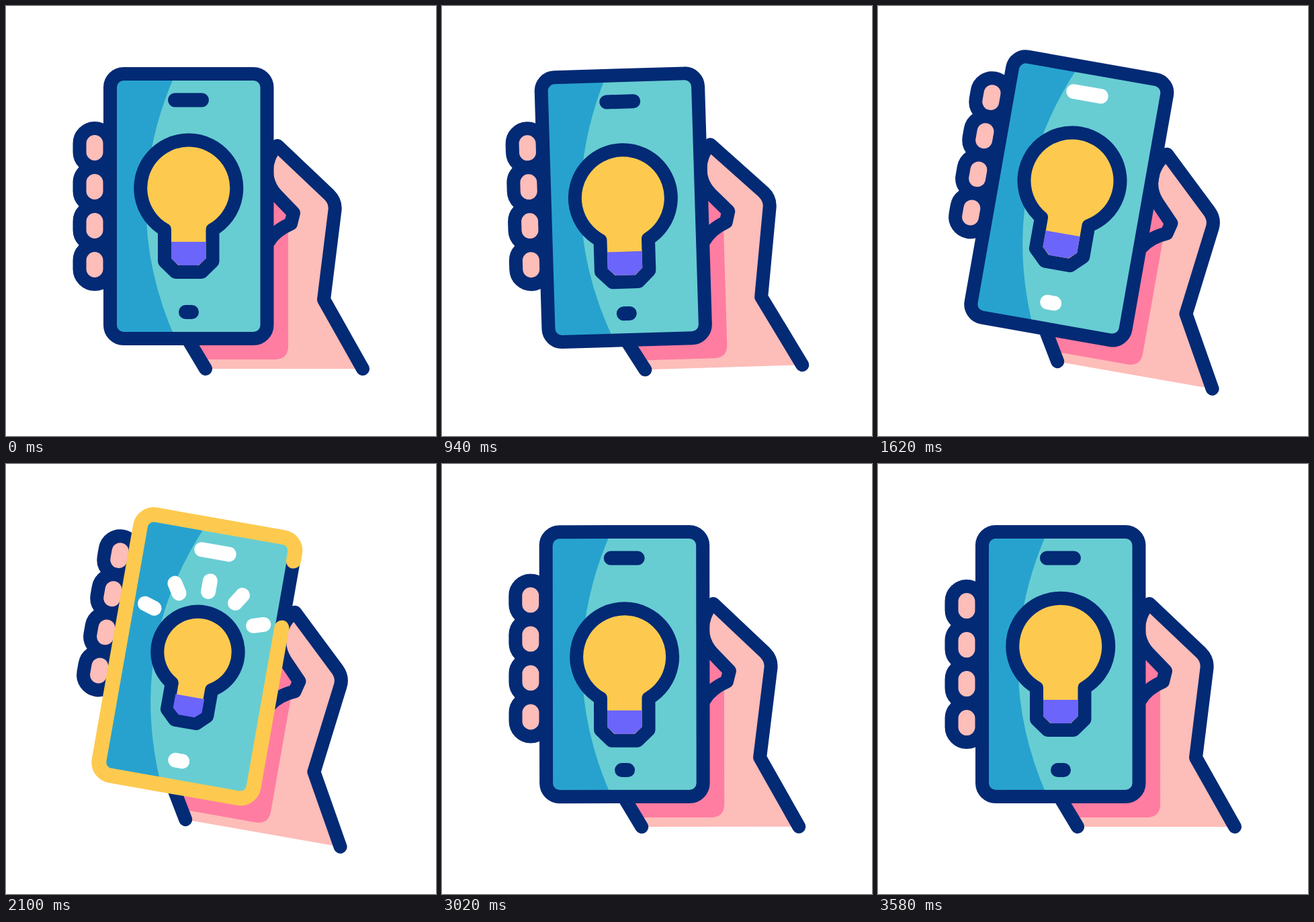
These frames come from a looping animation (640x640 px, 3600 ms). An HTML page:

```html
<!DOCTYPE html>
<html lang="en">
<head>
<meta charset="utf-8">
<title>Phone light</title>
<style>
  html, body { margin: 0; width: 100%; height: 100%; overflow: hidden; background: #fff; }
  svg { display: block; width: 100%; height: 100%; }
  .line { fill: none; stroke: #032a75; stroke-width: 20; stroke-linecap: round; stroke-linejoin: round; }
  .glow { fill: none; stroke: #fff; stroke-width: 22; stroke-linecap: round; stroke-linejoin: round; }
  .skin { fill: #fdbdb9; }
</style>
</head>
<body>
<svg viewBox="0 0 640 640">
  <g id="all">
    <path class="skin" d="M297 540H531L473 437 489 304Q490 290 480 281L404 208C392 218 388 235 388 245H250V462Z"/>
    <path fill="#ff7da1" d="M257 473 289 526H400Q420 526 420 506V328L424 324 428 308 402 283 380 270H257Z"/>
    <path class="line" d="M258 475 297 540"/>
    <path class="line" d="M531 540 473 437 489.500 304Q491 291 481 281L404 208C392 218 388 235 388 245C388 260 393 271 402 281L428 308 424 324C410 330 398 338 390 352"/>
    <g id="fingers"></g>

    <rect x="155" y="101" width="233.500" height="394" rx="20" fill="#67cdd2"/>
    <path fill="#27a2ce" d="M252 101H175Q155 101 155 121V475Q155 495 175 495H252Q165 298 252 101Z"/>
    <rect class="line" x="155" y="101" width="233.500" height="394" rx="20"/>
    <path class="line" style="stroke-width:21" d="M251.500 140H291.500M267.500 455.500H276.500"/>

    <g id="bulb">
      <path id="glass" class="line" style="fill:#fdca4f" d="M236 333A71.500 71.500 0 1 1 307.500 333V380L291 396H252.500L236 380Z"/>
      <path fill="#6b65fb" d="M246 351H297.500V376L286 386H257.500L246 376Z"/>
    </g>

    <path id="frame" class="glow" style="stroke:#fdca4f" pathLength="100"
      d="M388.500 234V475A20 20 0 0 1 368.500 495H175A20 20 0 0 1 155 475V121A20 20 0 0 1 175 101H368.500A20 20 0 0 1 388.500 121V234"/>
    <path id="bar" class="glow" pathLength="100" d="M251 140H292"/>
    <path id="dot" class="glow" pathLength="100" d="M267 455.500H277"/>
    <g id="rays"></g>
  </g>
</svg>
<script>
const LOOP = 3600;
const PIVOT = "344 364";
const BASE_Y = 399;
const NS = "http://www.w3.org/2000/svg";
const $ = id => document.getElementById(id);

function add(parent, tag, attrs) {
  const el = document.createElementNS(NS, tag);
  for (const key in attrs) el.setAttribute(key, attrs[key]);
  parent.appendChild(el);
  return el;
}

for (let i = 0; i < 4; i++) {
  add($("fingers"), "rect", {
    class: "line", style: "fill:#fdbdb9",
    x: 109.5, y: 182 + 58 * i, width: 45, height: 58, rx: 22.5
  });
}

// Each ray runs from its inner end outwards.
const rays = [
  "M196.500 238.500 182 234", "M229 210 220.500 196.500", "M271.500 200V184",
  "M314 210 322.500 196.500", "M346.500 238.500 361 234"
].map(d => add($("rays"), "path", { class: "glow", pathLength: 100, d }));

const ramp = (t, from, to) => Math.min(1, Math.max(0, (t - from) / (to - from)));
const ease = (t, from, to) => {
  const p = ramp(t, from, to);
  return p * p * (3 - 2 * p);
};

// Moves through the five poses of the shake.
const moves = [[0, 435], [760, 1100], [2820, 3220], [3220, 3588]];
function pose(t, values) {
  return moves.reduce((v, [from, to], i) =>
    v + (values[i + 1] - values[i]) * ease(t, from, to), values[0]);
}

function trim(el, from, to) {
  const len = (to - from) * 100;
  el.style.display = len > 0.01 ? "" : "none";
  el.setAttribute("stroke-dasharray", `${len} 300`);
  el.setAttribute("stroke-dashoffset", -from * 100);
}

function draw(t) {
  const angle = pose(t, [0, -16, 10, -10, 0]);
  const slide = pose(t, [0, 36, -41, 23, 0]);
  const drop = pose(t, [0, 27.5, 0, 31, 0]);
  const scale = 1 - 0.158 * (ease(t, 1640, 1960) - ease(t, 2420, 2800));

  $("all").setAttribute("transform", `rotate(${angle} ${PIVOT})`);
  $("fingers").setAttribute("transform", `translate(0 ${slide})`);
  $("bulb").setAttribute("transform",
    `translate(271.75 ${BASE_Y + drop}) scale(${scale}) translate(-271.75 ${-BASE_Y})`);
  $("glass").style.strokeWidth = 20 / scale;

  trim($("frame"), ease(t, 2400, 2800), ramp(t, 1645, 2142));
  for (const id of ["bar", "dot"]) {
    trim($(id), ease(t, 2400, 2800), ease(t, 1100, 1600));
  }
  for (const ray of rays) {
    trim(ray, ease(t, 2130, 2400), ease(t, 1720, 2060));
  }
}

const start = performance.now();
function tick() {
  draw((performance.now() - start) % LOOP);
  requestAnimationFrame(tick);
}
draw(0);
requestAnimationFrame(tick);
</script>
</body>
</html>
```
